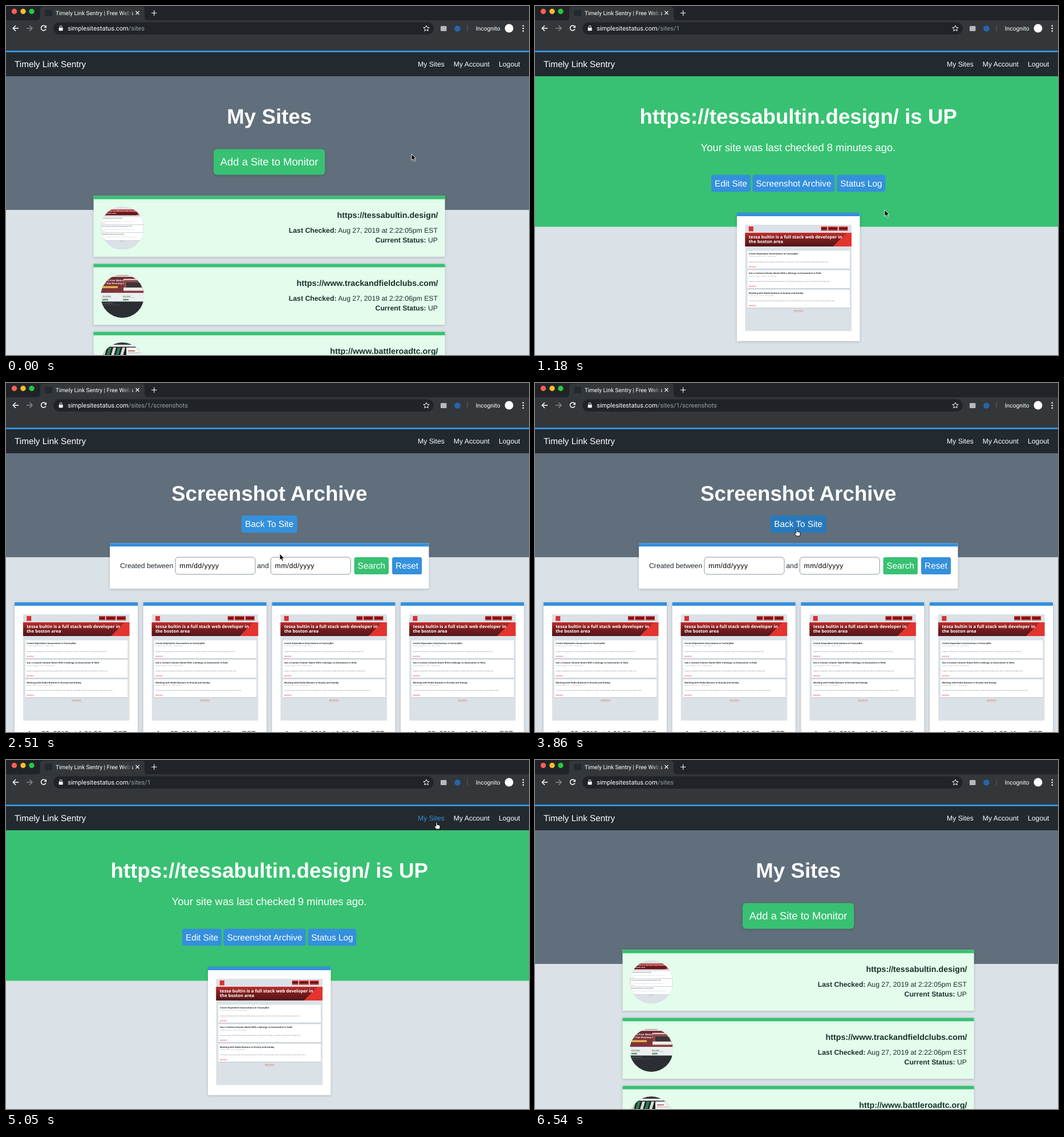
Recreate the animation shown at these times as an HTML page. Size 917 by 611 pixels, loop 6.69 s.

```html
<!DOCTYPE html>
<html lang="en">
<head>
<meta charset="utf-8">
<title>Site monitor</title>
<style>
  html, body { margin: 0; width: 100%; height: 100%; overflow: hidden; background: #dae1e7; }
  svg { display: block; width: 100%; height: 100%; font-family: "Liberation Sans", Arial, sans-serif; text-rendering: geometricPrecision; }
  .ui { font-family: Roboto, sans-serif; }
  .post { font-family: "Open Sans", sans-serif; }
  .b { font-weight: 700; }
  .mid { text-anchor: middle; }
  .end { text-anchor: end; }
  .card { filter: drop-shadow(0 1.5px 2px rgba(0, 0, 0, .2)); }
  .line { fill: none; stroke: #fff; stroke-width: 1.5; }
  .btn.hot rect { fill: #2779bd; }
  .nav.hot { fill: #3490dc; }
</style>
</head>
<body>
<svg id="stage" viewBox="0 0 917 611"></svg>
<script>
const BLUE = '#3490dc', GREEN = '#38c172', INK = '#22292f', SLATE = '#606f7b',
      PALE = '#dae1e7', BAR = '#33373a', STRIP = '#202428', FOREST = '#17332a';

const rect = (x, y, w, h, fill, more = '') =>
  `<rect x="${x}" y="${y}" width="${w}" height="${h}" fill="${fill}" ${more}/>`;
const dot = (x, y, r, fill) => `<circle cx="${x}" cy="${y}" r="${r}" fill="${fill}"/>`;
const text = (s, x, y, size, fill = '#fff', cls = '', id = '') =>
  `<text x="${x}" y="${y}" font-size="${size}" fill="${fill}" class="${cls}" id="${id}">${s}</text>`;
const card = (x, y, w, h, edge, fill = '#fff') =>
  `<g class="card">${rect(x, y, w, h, fill)}${rect(x, y, w, 6, edge)}</g>`;
const button = (s, x, y, w, h, id = '', fill = BLUE) =>
  `<g class="btn" id="${id}">${rect(x, y, w, h, fill, 'rx="3.6"')}${text(s, x + w / 2, y + 20.3, 15.3, '#fff', 'mid')}</g>`;
const title = s => text(s, 461.7, 205.8, 36.7, '#fff', 'b mid');
const hero = (bottom, fill) => rect(0, 123, 917, bottom - 123, fill);

// Small picture of a blog home page, 186.5 by 186
const posts = [
  ['Create Dependent Associations in FactoryBot', 'Posted on August 14, 2019 · 1 Minute Read',
   'Imagine the following set of models and relationships in an app: Box. The box is valid that has a what depends upon the...'],
  ['Use a Custom Column Name With a belongs_to Association in Rails', 'Posted on August 12, 2019 · 1 Minute Read',
   'Imagine an application with the following relationships: A model which through a post table. A model which through cover...'],
  ['Working with Radio Buttons in Dravily and Gatsby', 'Posted on July 11, 2019 · 1 Minute Read',
   'I recently ran into an issue with forms and checkboxes on a static site. Specifically, it had to do with a group of radio buttons. Very...']
];
const thumb = rect(0, 0, 186.5, 186, PALE) + rect(6.3, 3, 8, 8.5, '#d9302f') +
  [[133, 11], [145.3, 17], [164, 16]].map(([x, w]) =>
    rect(x, 3, w, 7.5, '#c92f2d') + rect(x + 1, 5.4, w - 2, 2.6, '#4a1416')).join('') +
  rect(0, 14, 186.5, 24, '#e3342f') + '<path d="M0 14H178L154 38H0Z" fill="url(#band)"/>' +
  text('tessa bultin is a full stack web developer in', 6.3, 23.6, 7.65, '#fff', 'post b') +
  text('the boston area', 6.3, 31.7, 7.65, '#fff', 'post b') +
  posts.map(([head, date, body], i) => {
    const y = 45.5 + 34.2 * i;
    return rect(3.8, y + .8, 179.6, 31.6, '#b8c2cc') + rect(3.8, y, 179.6, 31.4, '#fff') +
      text(head, 6.3, y + 6.6, 3.85, INK, 'post b') + text(date, 6.3, y + 10.9, 2.4, '#8795a1', 'post') +
      text(body, 6.3, y + 20.5, 2.5, SLATE, 'post') + text('Read More', 6.3, y + 28, 2.6, '#e3342f', 'post') +
      rect(6.3, y + 28.5, 12.5, .3, '#e3342f');
  }).join('') +
  text('View All Posts', 93.5, 151.4, 2.6, '#e3342f', 'post mid') + rect(85, 151.9, 17, .3, '#e3342f');

const defs = `<defs><g id="thumb">${thumb}</g>
  <linearGradient id="band" x2="0" y2="1"><stop stop-color="#c42d2b"/><stop offset=".45" stop-color="#7a1d1e"/><stop offset="1" stop-color="#52161a"/></linearGradient>
  <linearGradient id="fade"><stop stop-color="${BAR}" stop-opacity="0"/><stop offset="1" stop-color="${BAR}"/></linearGradient>
  <clipPath id="disc"><circle cx="38" cy="38" r="38"/></clipPath></defs>`;

const browser = rect(0, 0, 917, 26, STRIP) + rect(0, 25, 917, 53, BAR) +
  `<path d="M54 25Q60 25 60 19V6Q60 1 66 1H237Q243 1 243 6V19Q243 25 249 25Z" fill="${BAR}"/>` +
  dot(14.5, 9.5, 4.7, '#ff5f57') + dot(30, 9.5, 4.7, '#febc2e') + dot(45, 9.5, 4.7, '#28c840') +
  rect(68.5, 6.5, 12.5, 11.5, INK) +
  text('Timely Link Sentry | Free Webs', 87, 15.7, 10.1, '#fff', 'ui') + rect(203, 4, 18, 18, 'url(#fade)') +
  '<path class="line" style="stroke-width:1.1" d="M227.5 9l6 6m0-6l-6 6M255 12.3h9.5m-4.75-4.75v9.5"/>' +
  rect(83, 28.5, 667, 21.5, STRIP, 'rx="10.7"') +
  '<path class="line" d="M22.2 39H12.4m4.6-4.7L12.3 39l4.7 4.7"/>' +
  '<path class="line" style="stroke:#85898d" d="M36 39H46m-4.6-4.7L46 39l-4.6 4.7"/>' +
  '<path class="line" d="M69.8 36.4A4.4 4.4 0 1 0 70 40.4"/><path d="M71 33.7V38.2H66.5Z" fill="#fff"/>' +
  rect(92.7, 38, 7, 5.3, '#fff', 'rx=".7"') + '<path class="line" style="stroke-width:1" d="M94.3 38V36.5a1.9 1.9 0 0 1 3.8 0V38"/>' +
  '<text class="ui" x="108.2" y="43" font-size="11.1" fill="#fff">simplesitestatus.com<tspan id="path" fill="#9aa0a6"></tspan></text>' +
  '<path class="line" style="stroke-width:1" d="M737 34.1l1.5 3.3 3.6.4-2.7 2.4.8 3.5-3.2-1.8-3.2 1.8.8-3.5-2.7-2.4 3.6-.4Z"/>' +
  rect(762, 35, 10.5, 9, '#b5b9bd', 'rx="1.5"') + dot(791.5, 39.5, 5.3, '#2565ae') +
  rect(808.5, 33.5, 1, 11.5, '#5f6368') + text('Incognito', 823.7, 43, 10.35, '#fff', 'ui') + dot(882, 39, 7.5, '#fff') +
  [34.8, 39.3, 43.8].map(y => dot(906.8, y, 1.3, '#fff')).join('') +
  rect(0, 78, 917, 3, BLUE) + rect(0, 81, 917, 42, INK) +
  text('Timely Link Sentry', 15, 107, 15.3) + text('My Sites', 722, 106.3, 12.24, '#fff', 'nav', 'mine') +
  text('My Account', 784.7, 106.3, 12.24) + text('Logout', 864, 106.3, 12.24);

const clubPicture = rect(0, 0, 76, 76, '#f1efed') + rect(25, 1.5, 25, 1, '#8b6b6b') + rect(0, 4.5, 76, 28, '#7d3439') +
  rect(0, 4.5, 76, 8, '#6a2a30') + text('Get a Free Website', 3, 11.8, 4.6, '#fff', 'b') +
  text('for Your Running Club!', 3, 17.4, 4.2, '#fff', 'b') + rect(2, 20.5, 28, 3.5, '#e6b450') +
  rect(41, 7, 33, 23, '#8f4a4c') + rect(40, 8, 30, 2, '#e8dada') + rect(45, 14, 26, 9, '#3a3538') + rect(40, 23, 34, 5.5, '#eee9e7') +
  rect(0, 32.5, 76, 15, '#ecefef') + text('Free Hosting', 3, 38.8, 2.4, INK, 'b') + text('Easy Setup', 39, 38.8, 2.4, INK, 'b') +
  rect(3, 40, 16, .7, '#a4adb5') + rect(39, 40, 20, .7, '#a4adb5') + rect(3, 43, 10, 2.5, '#5a9a6c') + rect(39, 43, 10, 2.5, '#5a9a6c') +
  rect(0, 47.5, 76, 29, '#2b2f34') + rect(3, 50, 18, .7, '#777') + rect(3, 53, 32, .7, '#555');
const trackPicture = rect(0, 0, 76, 76, '#34383a') + rect(8, 4, 60, 3.5, '#f4f4f4') + rect(0, 8, 46, 20, '#1d2422') +
  [6, 14, 22, 30, 38].map((x, i) => `<path d="M${x} 9h5l-4 14h-5Z" fill="${i % 2 ? '#2f7d55' : '#d6dcd9'}"/>`).join('') +
  rect(45, 9, 30, 14, '#f3f3f3') + rect(48, 14, 12, 1.5, '#c04444') + rect(48, 18, 20, .8, '#999');

const siteCard = ([url, time, picture], i) => {
  const y = 332.3 + 119.1 * i;
  return card(153.5, y, 616.2, 106.7, GREEN, '#e3fcec') +
    `<g transform="translate(166 ${y + 18.5})" clip-path="url(#disc)">${picture}</g>` +
    text(url, 757.6, y + 38.7, 14.3, FOREST, 'b end') +
    text(`<tspan class="b">Last Checked:</tspan> Aug 27, 2019 at ${time} EST`, 757, y + 64.8, 12.24, FOREST, 'end') +
    text('<tspan class="b">Current Status:</tspan> UP', 757, y + 81.6, 12.24, FOREST, 'end');
};
const sites = hero(357, SLATE) + title('My Sites') +
  `<g class="card">${rect(364, 250.5, 195.3, 45, GREEN, 'rx="6"')}</g>` + text('Add a Site to Monitor', 461.6, 279, 18.36, '#fff', 'mid') +
  [['https://tessabultin.design/', '2:22:05pm', '<use href="#thumb" transform="scale(.407)"/>'],
   ['https://www.trackandfieldclubs.com/', '2:22:06pm', clubPicture],
   ['http://www.battleroadtc.org/', '2:22:07pm', trackPicture]].map(siteCard).join('');

const site = hero(386.5, GREEN) + title('https://tessabultin.design/ is UP') +
  text('', 461.5, 254.2, 18.4, '#fff', 'mid', 'checked') +
  button('Edit Site', 309, 295.5, 69, 29.8) + button('Screenshot Archive', 381.5, 295.5, 144, 29.8, 'archive') +
  button('Status Log', 529.5, 295.5, 84.8, 29.8) +
  card(354, 362, 215.5, 224.7, BLUE) + '<use href="#thumb" x="368.5" y="383"/>';

const field = x => rect(x, 305, 140, 30, '#fff', 'rx="5" stroke="#8795a1"') +
  `<text x="${x + 7.3}" y="324.3" font-size="12.24" letter-spacing=".4">mm/dd/yyyy</text>`;
const shots = hero(305, SLATE) + title('Screenshot Archive') + button('Back To Site', 412.8, 232, 97.8, 30, 'back') +
  card(182, 280.3, 559.5, 79.7, BLUE) + text('Created between', 200, 324.3, 12.24, INK) + field(297) +
  text('and', 440.3, 324.3, 12.24, INK) + field(464.3) +
  button('Search', 610.5, 305, 60.5, 30, '', GREEN) + button('Reset', 677, 305, 52.2, 30) +
  ['26, 2019 at 1:01:58', '25, 2019 at 1:01:58', '24, 2019 at 1:01:20', '23, 2019 at 1:00:41'].map((day, i) => {
    const x = 15 + 225.7 * i;
    return card(x, 384, 216, 240, BLUE) + `<use href="#thumb" x="${x + 15}" y="405"/>` +
      text(`Aug ${day}pm EST`, x + 109.5, 618, 12.24, INK, 'mid');
  }).join('');

const $ = id => document.getElementById(id);
const pages = { sites, site, shots };
$('stage').innerHTML = defs + rect(0, 0, 917, 611, PALE) +
  Object.entries(pages).map(([id, body]) => `<g id="${id}">${body}</g>`).join('') + browser +
  `<g id="cursor">
    <path id="arrow" d="M0 0V11.2L2.6 8.8 4.3 12.8 6.3 12 4.6 8.1H8Z" fill="#000" stroke="#fff" stroke-width=".9"/>
    <path id="hand" d="M-1.1 1C-1.1-.7 1-.7 1 1V4.4L4.6 5Q6 5.3 6 7V8.8Q6 10 5 12H-.5L-3.7 8Q-4 6.2-2.3 6.5L-1.1 7.4Z" fill="#fff" stroke="#000" stroke-width=".9"/>
  </g>`;

// start of each view: time, page, path, minutes since the check
const views = [
  [0, 'sites', '/sites'], [1180, 'site', '/sites/1', 8], [2510, 'shots', '/sites/1/screenshots'],
  [4010, 'site', '/sites/1', 9], [5500, 'sites', '/sites']
];
// pointer moves: first step, last step, number of steps, where to
const moves = [
  [440, 880, 4, 613, 357], [1920, 2360, 4, 480, 299], [3560, 3860, 3, 459, 256],
  [4450, 5050, 5, 755, 109], [5800, 6540, 6, 930, 330]
];
// links that react: page (any if empty), id, box
const links = [
  ['sites', '', 580, 355, 758, 378], ['site', 'archive', 381, 295, 526, 326],
  ['shots', 'back', 412, 232, 511, 262], ['', 'mine', 722, 92, 769, 114]
];

function pointer(t) {
  let x = 711, y = 259;
  for (const [a, b, n, toX, toY] of moves) {
    if (t < a) break;
    const step = Math.floor((t - a) / (b - a) * (n - 1) + 1e-6) + 1;
    const p = Math.min(1, step / n), ease = p * p * (3 - 2 * p);
    x += (toX - x) * ease;
    y += (toY - y) * ease;
  }
  return [x, y];
}

function draw(now) {
  const t = now % 6690;
  const [, page, path, minutes] = views.filter(v => v[0] <= t).pop();
  const [x, y] = pointer(t);
  for (const id in pages) $(id).style.display = id === page ? '' : 'none';
  $('path').textContent = path;
  if (minutes) $('checked').textContent = `Your site was last checked ${minutes} minutes ago.`;
  let over = false;
  for (const [where, id, l, top, r, bottom] of links) {
    const hit = (!where || where === page) && x >= l && x <= r && y >= top && y <= bottom;
    if (id) $(id).classList.toggle('hot', hit);
    over ||= hit;
  }
  $('cursor').setAttribute('transform', `translate(${x} ${y})`);
  $('arrow').style.display = over ? 'none' : '';
  $('hand').style.display = over ? '' : 'none';
}

let start;
function tick(now) {
  start ??= now;
  draw(now - start);
  requestAnimationFrame(tick);
}
draw(0);
requestAnimationFrame(tick);
</script>
</body>
</html>
```
